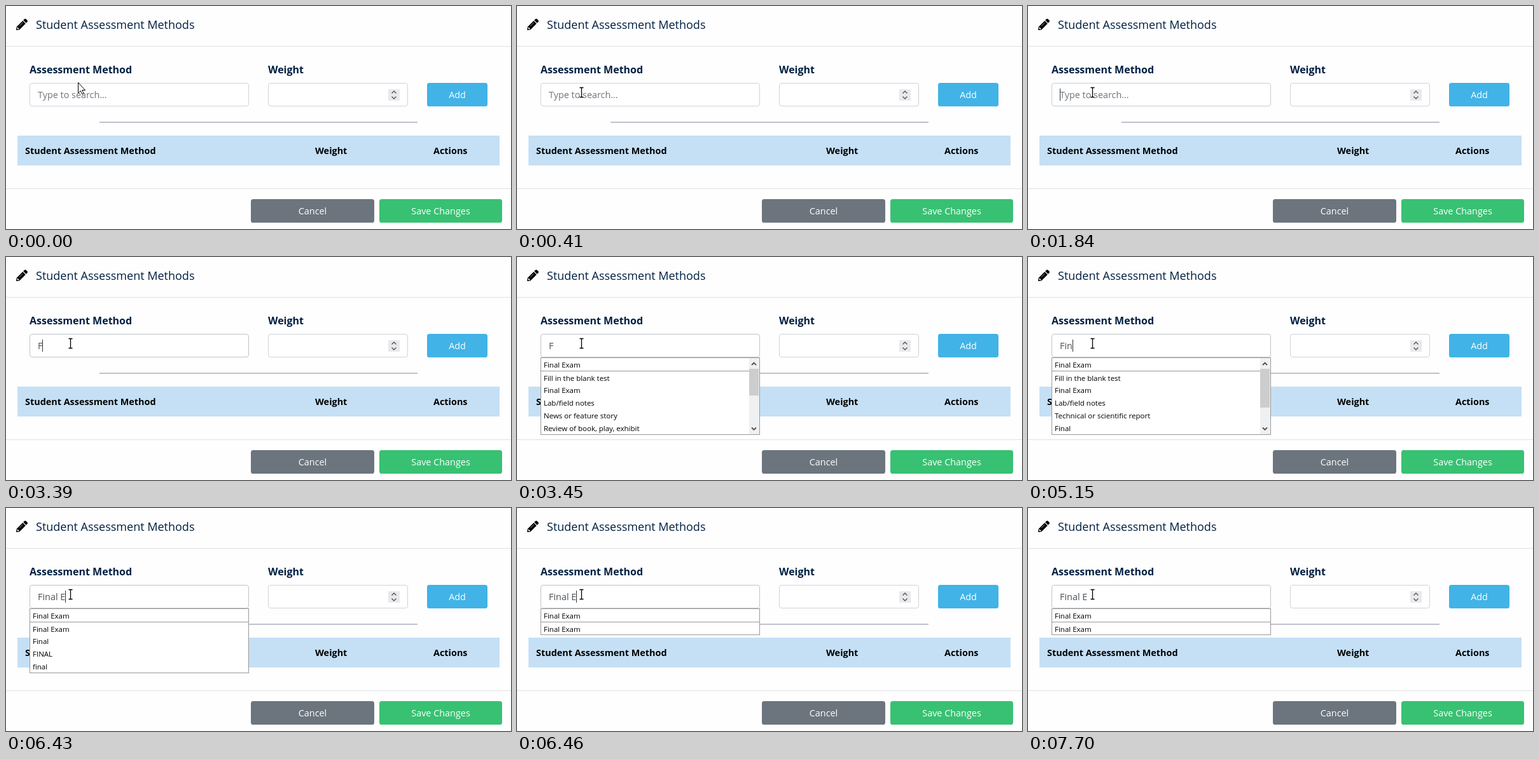
An HTML page for the animation above (8 s loop, 794x351 px).

```html
<!DOCTYPE html>
<html lang="en">
<head>
<meta charset="utf-8">
<title>Student Assessment Methods</title>
<style>
  html, body { margin: 0; width: 100%; height: 100%; overflow: hidden; background: #fefefe; }
  svg { display: block; font: 14.4px "Open Sans", "Noto Sans", sans-serif; }
  text { white-space: pre; }
  .navy { fill: #001f42; }
  .bold { font-weight: 700; }
  .label { font-size: 16px; }
  .mid { text-anchor: middle; fill: #fff; }
  .field { fill: #fff; stroke: #ced4da; }
  .chevron { fill: none; stroke: #505050; stroke-width: 1.8; }
  #menu text { font-size: 11.5px; fill: #000; }
</style>
</head>
<body>
<svg width="794" height="351" viewBox="0 0 794 351">
  <rect width="794" height="351" fill="#fefefe"/>
  <path d="M0 63.5H794M0 287.5H794" stroke="#dee2e6"/>

  <g transform="translate(16 20) scale(.0352)">
    <path d="M498 142L452 188Q443 196 435 188L324 77Q316 68 324 60L370 14Q404-14 438 14L498 74Q526 108 498 142ZM284 100L22 362L0 484Q0 512 28 512L150 490L412 228Q420 219 412 211L301 100Q293 92 284 100Z"/>
    <path d="M88 424V376L50 395L42 440L72 470L117 462L136 424Z" fill="#fefefe"/>
    <path d="M140 330L290 180" stroke="#fefefe" stroke-width="18"/>
  </g>
  <text class="navy" x="47" y="36" font-size="18">Student Assessment Methods</text>

  <text class="navy bold label" x="37" y="106">Assessment Method</text>
  <text class="navy bold label" x="412" y="106">Weight</text>
  <rect id="search" class="field" x="37.5" y="121.5" width="344" height="36" rx="3.5"/>
  <text id="value" x="50" y="145"></text>
  <rect id="caret" y="130" width="1" height="19" fill="#333"/>
  <rect class="field" x="412.5" y="121.5" width="219" height="36" rx="3.5"/>
  <rect x="601" y="131" width="18" height="18" fill="#e9e9ed"/>
  <path class="chevron" style="stroke-width:1.3" d="M606.5 137.5l3.5-3.5 3.5 3.5M606.5 142.5l3.5 3.5 3.5-3.5"/>
  <rect x="662" y="121" width="95" height="37" rx="3.6" fill="#41b3e6"/>
  <text class="mid" x="709.5" y="145">Add</text>

  <rect x="147" y="182" width="500" height="2" fill="#bfc2cd"/>
  <rect x="18" y="204" width="758" height="47" fill="#c5e0f5"/>
  <g class="bold">
    <text x="30" y="233">Student Assessment Method</text>
    <text x="486" y="233">Weight</text>
    <text x="672" y="233">Actions</text>
  </g>

  <rect x="385" y="304" width="194" height="37" rx="3.6" fill="#6c757d"/>
  <text class="mid" x="482" y="328">Cancel</text>
  <rect x="587" y="304" width="193" height="37" rx="3.6" fill="#38c172"/>
  <text class="mid" x="683.5" y="328">Save Changes</text>

  <g id="menu"></g>

  <path id="arrow" transform="translate(113.5 120.5)" d="M0 0V16.5L3.8 13L6.4 18.5L8.8 17.4L6.3 12H11Z" fill="#fff" stroke="#000"/>
  <g id="beam" fill="none">
    <path d="M-3 -7.5H3M0 -7.5V7.5M-3 7.5H3" stroke="#fff" stroke-width="2.6" opacity=".8"/>
    <path d="M-3 -7.5H3M0 -7.5V7.5M-3 7.5H3" stroke="#000" stroke-width="1.3"/>
  </g>
</svg>
<script>
const LOOP = 8000;
const $ = id => document.getElementById(id);

// Suggestion lists; thumb is the scrollbar thumb height, 0 for no scrollbar.
const LISTS = {
  wide: { thumb: 42, rows: ["Fill in the blank test", "Final Exam", "Lab/field notes", "News or feature story", "Review of book, play, exhibit"] },
  mid: { thumb: 61, rows: ["Fill in the blank test", "Final Exam", "Lab/field notes", "Technical or scientific report", "Final"] },
  few: { thumb: 0, rows: ["Final Exam", "Final", "FINAL", "final"] },
  one: { thumb: 0, rows: ["Final Exam"] }
};

// time, typed text, caret x (0 = hidden), list
const STEPS = [
  [0, "", 0, ""],
  [1840, "", 50, ""],
  [2360, "", 0, ""],
  [2890, "", 50, ""],
  [3390, "F", 57, ""],
  [3450, "F", 0, "wide"],
  [3570, "Fi", 61, "wide"],
  [3660, "Fi", 61, "mid"],
  [3970, "Fi", 0, "mid"],
  [4470, "Fi", 61, "mid"],
  [5060, "Fi", 0, "mid"],
  [5150, "Fin", 70, "mid"],
  [5200, "Fin", 70, "few"],
  [5260, "Fina", 78, "few"],
  [5410, "Final", 82, "few"],
  [5560, "Final", 0, "few"],
  [6430, "Final E", 93, "few"],
  [6460, "Final E", 93, "one"],
  [6610, "Final E", 0, "one"],
  [7170, "Final E", 93, "one"],
  [7700, "Final E", 0, "one"]
];

const MOVES = [90, 140, 190, 250, 300, 350, 410];

function menuMarkup(name) {
  if (!name) return "";
  const { thumb, rows } = LISTS[name];
  const bottom = 180 + rows.length * 20;
  const edge = thumb ? 365 : 381;
  let out = `<rect x="37.5" y="158.5" width="344" height="${bottom - 159}" fill="#fff" stroke="#999"/>
    <path d="M38 179.5H${edge}" stroke="#999"/><text x="42" y="174">Final Exam</text>`;
  rows.forEach((row, i) => {
    out += `<text x="42" y="${i ? 194 + i * 20 : 195}">${row}</text>`;
  });
  if (thumb) {
    out += `<rect x="365" y="159" width="16" height="120" fill="#f0f0f0"/>
      <rect x="365" y="176" width="15" height="${thumb}" fill="#cdcdcd"/>
      <path class="chevron" d="M369 170l3.5-3.5 3.5 3.5M369 268.5l3.5 3.5 3.5-3.5"/>`;
  }
  return out;
}

let shownList = "";

function draw(t) {
  const [, typed, caret, list] = STEPS.findLast(s => s[0] <= t);
  const value = $("value");
  value.textContent = typed || "Type to search…";
  value.setAttribute("fill", typed ? "#495057" : "#6c757d");
  $("caret").setAttribute("x", caret);
  $("caret").style.display = caret ? "" : "none";
  $("search").style.stroke = t < 1840 ? "#ced4da" : t < 1900 ? "#c8cdd3" : "#bfc4c9";
  if (list !== shownList) {
    $("menu").innerHTML = menuMarkup(list);
    shownList = list;
  }

  const move = MOVES.filter(m => m <= t).length;
  $("arrow").style.display = move ? "none" : "";
  $("beam").style.display = move ? "" : "none";
  const left = (MOVES.length - move) / (MOVES.length - 1);
  const k = left * left;
  $("beam").setAttribute("transform", `translate(${101.5 + Math.round(11 * k)} ${136 - Math.round(10 * k)})`);
}

const start = performance.now();
function tick() {
  draw((performance.now() - start) % LOOP);
  requestAnimationFrame(tick);
}
tick();
</script>
</body>
</html>
```
